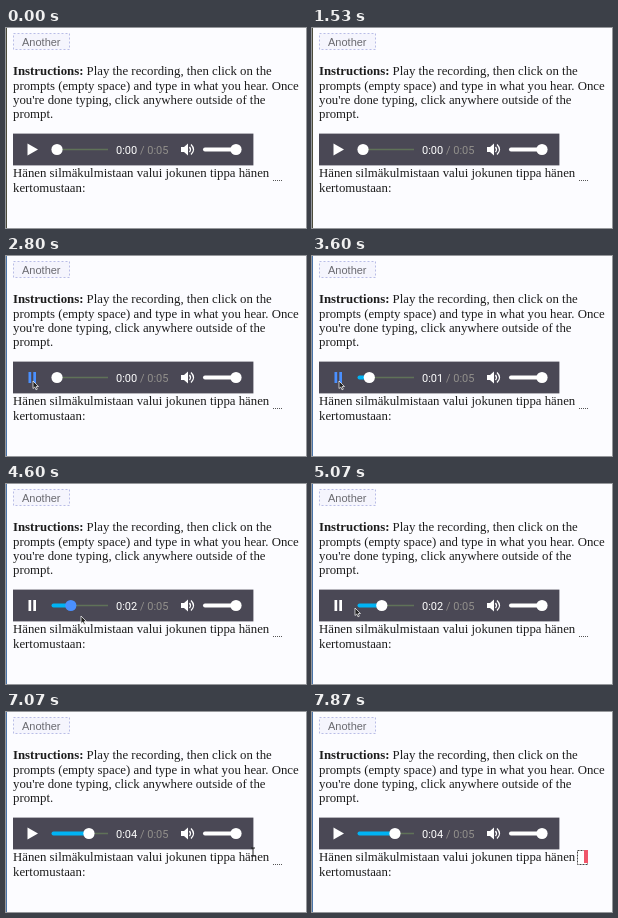
An HTML page for the animation above (8 s loop, 300 px wide and 200 px high).

```html
<!DOCTYPE html>
<html lang="en">
<head>
<meta charset="utf-8">
<title>Listening exercise</title>
<style>
  html, body { margin: 0; width: 100%; height: 100%; overflow: hidden; background: #fcfcff; }
  svg { display: block; width: 100vw; height: 100vh; }
  .body { font: 12.8px "Liberation Serif", serif; fill: #1c1c1c; }
  .label { font: 11px "Liberation Sans", sans-serif; fill: #6a6a70; }
  .clock { font: 11px Roboto, sans-serif; fill: #fff; }
  .round { stroke-linecap: round; stroke-width: 4; }
</style>
</head>
<body>
<svg viewBox="0 0 300 200">
  <rect width="300" height="200" fill="#fcfcff"/>
  <rect id="edge" width="1" height="200"/>

  <rect x="7.5" y="5.5" width="56" height="16" fill="#f5f5fd" stroke="#b9bde6" stroke-dasharray="2 2"/>
  <text class="label" x="16" y="18">Another</text>

  <g class="body">
    <text x="7" y="47"><tspan font-weight="bold">Instructions:</tspan> Play the recording, then click on the</text>
    <text x="7" y="61.5">prompts (empty space) and type in what you hear. Once</text>
    <text x="7" y="76">you're done typing, click anywhere outside of the</text>
    <text x="7" y="90.3">prompt.</text>
    <text x="7" y="149.2">Hänen silmäkulmistaan valui jokunen tippa hänen</text>
    <text x="7" y="163.6">kertomustaan:</text>
  </g>

  <rect x="7" y="105.6" width="240.4" height="31.8" fill="#4a4855"/>
  <path id="play" d="M21.5 115.5L32 121.5L21.5 127.5Z"/>
  <path id="pause" d="M22.5 116h2.7v11h-2.7zM27.3 116h2.7v11h-2.7z"/>
  <path d="M51 121.5H102" stroke="#5f7258" stroke-width="1.6"/>
  <path id="progress" class="round" stroke="#00b3f4"/>
  <circle id="thumb" cy="121.5" r="5.6"/>
  <text class="clock" x="110" y="125.5"><tspan id="time"></tspan><tspan fill="#92908c"> / 0:05</tspan></text>
  <path d="M175 119h3l4-3.5v12l-4-3.5h-3z" fill="#fff"/>
  <path d="M183.5 119q2 2.5 0 5M185 116.5q5 5 0 10" fill="none" stroke="#fff" stroke-width="1.3"/>
  <path class="round" d="M199 121.5H230" stroke="#fff"/>
  <circle cx="230" cy="121.5" r="5.6" fill="#fff"/>

  <path id="blank" d="M267 152.5H276" stroke="#555" stroke-dasharray="1 1"/>
  <g id="field">
    <rect x="265.5" y="138.5" width="10" height="14" fill="#fff" stroke="#444" stroke-dasharray="2 1"/>
    <rect x="272" y="138" width="4" height="13" fill="#f0566a"/>
  </g>
  <path id="arrow" d="M0 0V7.5L1.8 6L3 8.8L4.3 8.2L3.2 5.5H5.5Z" fill="#222" stroke="#fff" stroke-width=".7"/>
  <path id="beam" d="M-2 -4H2M0 -4V4M-2 4H2" stroke="#222"/>
</svg>
<script>
const LOOP = 8000, STEP = 1000 / 15;
const $ = id => document.getElementById(id);
const show = (id, on) => $(id).style.display = on ? '' : 'none';

// time, x, y of the pointer
const pointerPath = [
  [1530, 198, 203], [2130, 28, 128], [2270, 27, 126], [2400, 27, 126],
  [2600, 33, 125], [2800, 27, 125], [4130, 27, 125], [4600, 75, 132],
  [4930, 45, 125], [5070, 43, 124], [5530, 36, 124], [6930, 36, 124],
  [7070, 247, 140], [7270, 247, 140], [7670, 270, 145]
];
const seekTimes = [3000, 3270, 3600, 3870, 4130, 4400, 4670, 4930, 5200, 5530, 5800, 6070, 6330];
const secondTimes = [3600, 4400, 5530, 6330];
const PLAY = 2670, PAUSE = 6470, FOCUS = 7730;

function pointerAt(t) {
  const i = pointerPath.findIndex(p => p[0] > t);
  if (i === 0) return [-20, -20];
  if (i < 0) return pointerPath.at(-1).slice(1);
  const [t0, x0, y0] = pointerPath[i - 1], [t1, x1, y1] = pointerPath[i];
  const k = (t - t0) / (t1 - t0), ease = k * k * (3 - 2 * k);
  return [x0 + (x1 - x0) * ease, y0 + (y1 - y0) * ease];
}

function draw(ms) {
  const t = Math.floor(ms / STEP + .06) * STEP + 5;
  const [x, y] = pointerAt(t);
  const over = (left, right) => x > left && x < right && y > 106 && y < 137;
  const playing = t >= PLAY && t < PAUSE;
  const tint = hovered => hovered ? '#4a90ff' : '#fff';

  $('edge').setAttribute('fill', t < 1800 ? '#4c4c3c' : '#4a74a8');
  for (const id of ['play', 'pause']) $(id).setAttribute('fill', tint(over(12, 41)));
  show('play', !playing);
  show('pause', playing);

  const tick = seekTimes.findLast(s => s <= t) ?? 0;
  const thumbX = 51 + Math.max(0, tick - 2930) * .0094;
  $('thumb').setAttribute('cx', thumbX);
  $('thumb').setAttribute('fill', tint(over(46, 106)));
  $('progress').setAttribute('d', `M47.5 121.5H${thumbX}`);
  show('progress', thumbX > 52);
  $('time').textContent = '0:0' + secondTimes.filter(s => s <= t).length;

  const focused = t >= FOCUS, overText = x > 240;
  show('field', focused);
  show('blank', !focused);
  show('arrow', !overText);
  show('beam', overText && !focused);
  for (const id of ['arrow', 'beam']) $(id).setAttribute('transform', `translate(${x} ${y})`);
}

const start = performance.now();
function frame() {
  draw((performance.now() - start) % LOOP);
  requestAnimationFrame(frame);
}
frame();
</script>
</body>
</html>
```
